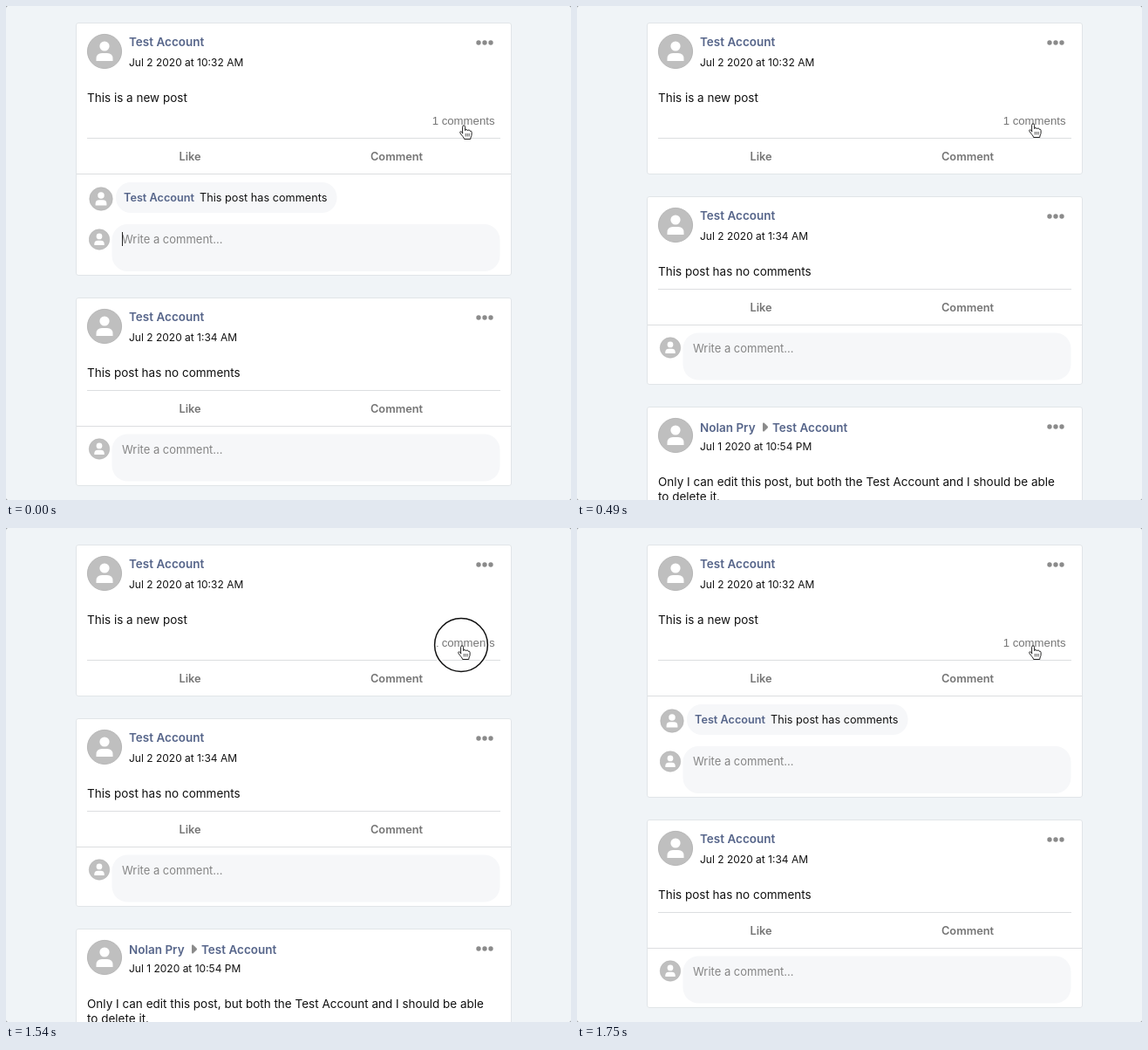
An HTML page for the animation above (2.03 s loop, 648x566 px).

```html
<!DOCTYPE html>
<html lang="en">
<head>
<meta charset="utf-8">
<title>Post feed</title>
<style>
  html, body { margin: 0; width: 100%; height: 100%; overflow: hidden; background: #8b8f92; }
  svg { display: block; font-family: Inter, Roboto, sans-serif; }
  .card { fill: #fff; stroke: #e1e5e8; }
  .rule { stroke: #dcdee0; }
  .name, .action { font-weight: 600; }
  .name { font-size: 13.5px; fill: #56658a; }
  .date { font-size: 12px; fill: #111; }
  .body { font-size: 13.5px; fill: #111; }
  .action { font-size: 12.8px; fill: #757575; text-anchor: middle; }
  .small { font-size: 12.7px; }
  .hint { font-size: 13px; fill: #858585; }
  .count { font: 13.2px "Liberation Sans", Arial, sans-serif; fill: #757575; text-anchor: end; }
  .bubble { fill: #f6f7f9; }
  .grey { fill: #8b8b8b; }
</style>
</head>
<body>
<svg id="stage" width="648" height="566" viewBox="0 0 648 566"></svg>
<script>
const LOOP = 2030;

const text = (kind, x, y, value) => `<text class="${kind}" x="${x}" y="${y}">${value}</text>`;
const rule = (x1, x2, y) => `<path class="rule" d="M${x1} ${y}H${x2}"/>`;
const bubble = (x, y, w, h, r) => `<rect class="bubble" x="${x}" y="${y}" width="${w}" height="${h}" rx="${r}"/>`;
const group = (y, content, id = '') => `<g ${id && `id="${id}"`} transform="translate(0 ${y})">${content}</g>`;
const frame = (height, id = '') =>
  `<rect ${id && `id="${id}"`} class="card" x="80.5" y=".5" width="499" height="${height}" rx="2.5"/>`;

const avatar = (x, y, r) => `
  <g transform="translate(${x} ${y}) scale(${r / 20})">
    <circle r="19.6" fill="#bfbfbf" stroke="#adadad" stroke-width=".8"/>
    <circle cy="-6" r="5.6" fill="#fff"/>
    <path d="M-9.5 11V8.5Q-9.5 2-3 2H3Q9.5 2 9.5 8.5V11Z" fill="#fff"/>
  </g>`;

const dots = [542, 549, 556].map(x => `<circle class="grey" cx="${x}" cy="23" r="2.7"/>`).join('');

const header = date => avatar(113, 33, 20) + dots + text('date', 141, 50, date);

const actions = y => rule(93, 567, y) +
  text('action', 211, y + 25.5, 'Like') + text('action', 448, y + 25.5, 'Comment');

const reply = y => rule(81, 579, y - 58 + 49) + avatar(107, y + 17, 12) +
  bubble(121.5, y, 445, 54, 18) + text('hint', 133, y + 22, 'Write a comment...');

const newPost = frame(289, 'firstCard') +
  header('Jul 2 2020 at 10:32 AM') +
  text('name', 141, 27, 'Test Account') +
  text('body', 93, 91, 'This is a new post') +
  text('count', 560.5, 117, '1 comments') +
  actions(132.5) +
  `<g id="comments">
    ${rule(81, 579, 173.5)}
    ${avatar(109, 202, 13.5)}
    ${bubble(126, 183, 253.5, 35, 17)}
    ${text('name small', 135, 205, 'Test Account')}
    ${text('body small', 222, 205, 'This post has comments')}
    ${avatar(107, 248.5, 12)}
    ${bubble(121.5, 231, 445, 54, 18)}
    ${text('hint', 133, 253, 'Write a comment...')}
    <path id="caret" d="M133.5 240V256" stroke="#222"/>
  </g>`;

const quietPost = frame(215) +
  header('Jul 2 2020 at 1:34 AM') +
  text('name', 141, 27, 'Test Account') +
  text('body', 93, 91, 'This post has no comments') +
  actions(106.5) + reply(156.5);

const sharedPost = frame(260) +
  header('Jul 1 2020 at 10:54 PM') +
  text('name', 141, 29, 'Nolan Pry') +
  '<path class="grey" d="M213 19.5Q213 18 214.5 18.6L218.6 22.6Q219.4 23.5 218.6 24.4L214.5 28.4Q213 29 213 27.5Z"/>' +
  text('name', 224, 29, 'Test Account') +
  text('body', 93, 91, 'Only I can edit this post, but both the Test Account and I should be able') +
  text('body', 93, 108, 'to delete it.');

const hand = `
  <path d="M4.6 10.2V2.4a1.5 1.5 0 0 1 3 0V6.6q.3-1 1.4-1 1.2 0 1.5 1.2.3-.9 1.4-.8 1.1.1 1.3 1.3
    1.9-.6 1.9 1.4V11q0 1.6-.8 2.9-.5.9-.5 2.6H6.6q-.3-1.5-1.6-2.9-1.5-1.6-3-4-.8-1.6.5-1.8 1.1 0 2.1 1.5z"
    fill="#fff" stroke="#222" stroke-linejoin="round"/>
  <path d="M8.2 10V13.5M10.2 10V13.5M12.2 10V13.5" stroke="#333" stroke-width=".8"/>`;

document.getElementById('stage').innerHTML = `
  <rect width="648" height="566" rx="2.5" fill="#f0f4f7"/>
  ${group(19, newPost)}
  <g id="below">${group(334, quietPost)}${group(575, sharedPost)}</g>
  <g id="ring" fill="none">
    <circle cx="522" cy="134" r="30.4" stroke="#fff" stroke-width="5"/>
    <circle cx="522" cy="134" r="30.4" stroke="#111" stroke-width="1.5"/>
  </g>
  <g id="cursor">${hand}</g>`;

// Each step is [start in ms, value]; a value holds until the next step.
function play(id, property, steps) {
  const frames = steps.map(([ms, value]) => ({ offset: ms / LOOP, [property]: value, easing: 'steps(1, end)' }));
  frames.push({ offset: 1, [property]: steps.at(-1)[1] });
  document.getElementById(id).animate(frames, { duration: LOOP, iterations: Infinity });
}

const COLLAPSE = 490, EXPAND = 1680;
const at = (x, y) => `translate(${x}px, ${y}px)`;

play('cursor', 'transform', [[0, at(519, 136)], [70, at(518, 135)], [140, at(517, 134)]]);
play('caret', 'opacity', [[0, 1], [280, 0]]);
play('ring', 'opacity', [[0, 0], [280, 1], [420, 0], [1470, 1], [1610, 0]]);
play('comments', 'opacity', [[0, 1], [COLLAPSE, 0], [EXPAND, 1]]);
play('firstCard', 'height', [[0, '289px'], [COLLAPSE, '173px'], [EXPAND, '289px']]);
play('below', 'transform', [[0, at(0, 0)], [COLLAPSE, at(0, -116)], [EXPAND, at(0, 0)]]);
</script>
</body>
</html>
```
